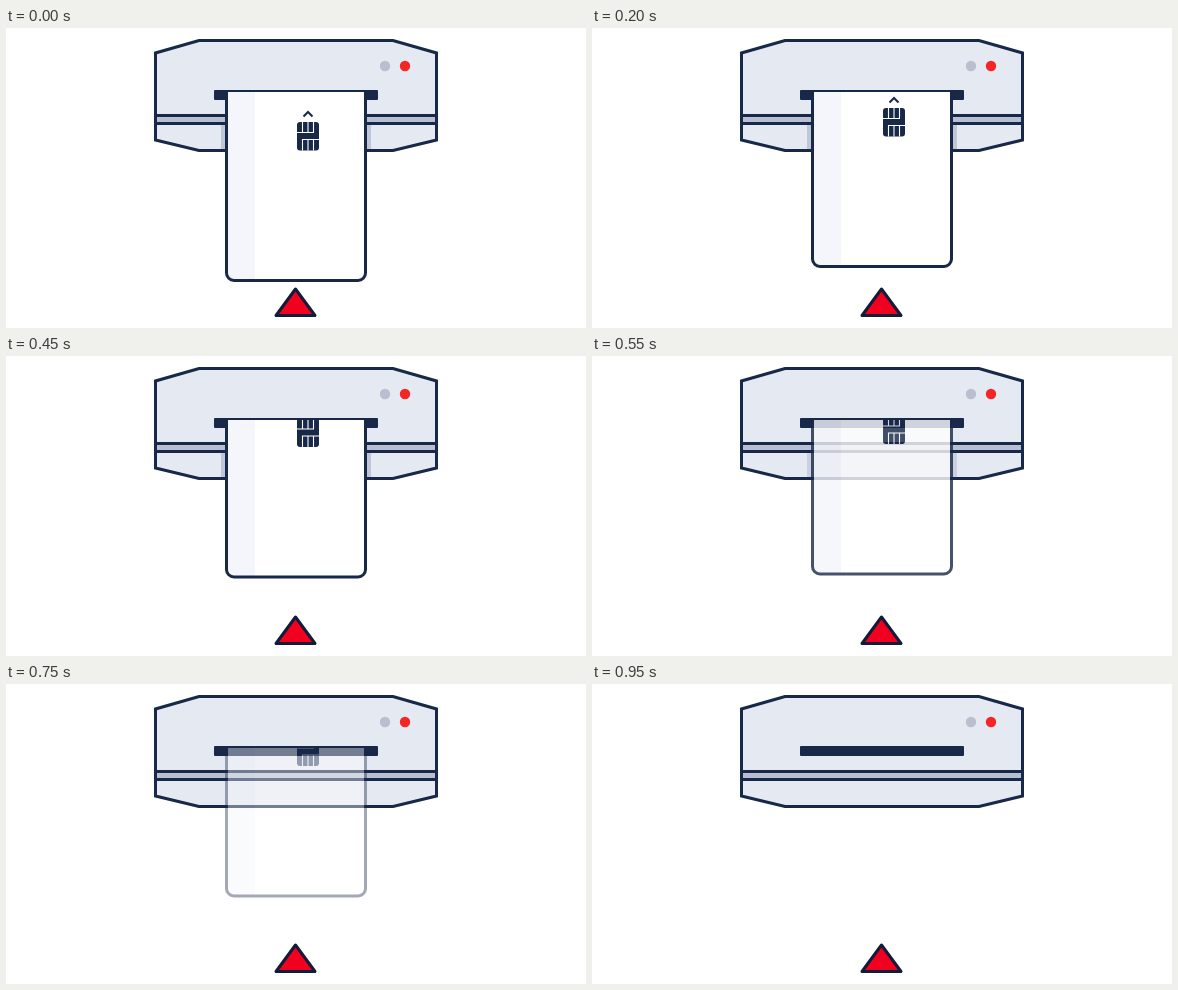
Write an HTML page that moves like this. It is 580 px wide and 300 px high and loops after 1 s.

```html
<!DOCTYPE html>
<html lang="en">
<head>
<meta charset="utf-8">
<title>Card reader</title>
<style>
  html, body { margin: 0; width: 100%; height: 100%; overflow: hidden; background: #fff; }
  svg { display: block; width: 580px; height: 300px; }
</style>
</head>
<body>
<svg viewBox="0 0 580 300">
  <defs>
    <clipPath id="below"><rect x="200" y="64" width="180" height="236"/></clipPath>
  </defs>

  <g stroke="#182848" stroke-width="3">
    <path fill="#e5e9f2" d="M193 12.5H387L430.5 25V112L387 122.5H193L149.5 112V25Z"/>
    <path fill="#b8bfd2" d="M149.5 87.5H430.5V95.5H149.5Z"/>
  </g>
  <circle cx="379" cy="38" r="5.2" fill="#b9bed0"/>
  <circle cx="399" cy="38" r="5.2" fill="#f32626"/>
  <rect x="208" y="62" width="164" height="10" rx="1" fill="#182848"/>
  <rect id="shadow" x="215" y="97" width="150" height="24" fill="#bfc6d8"/>

  <g id="fade" clip-path="url(#below)">
    <g id="card">
      <rect x="220.5" y="40" width="139" height="212.5" rx="7.5" fill="#fff"/>
      <path d="M220.5 40H249V252.5H228Q220.5 252.5 220.5 245Z" fill="#f5f6fb"/>
      <rect x="220.5" y="40" width="139" height="212.5" rx="7.5" fill="none" stroke="#182848" stroke-width="3"/>
      <path d="M297.5 88.5L302 84L306.5 88.5" fill="none" stroke="#182848" stroke-width="2"/>
      <rect x="291" y="94" width="22" height="28.5" rx="3" fill="#182848"/>
      <path d="M296.5 94V104.5M302 94V104.5M307.5 94V104.5M291 104.5H308M296 111.5H313M296.5 111V122.5M302 111V122.5M307.5 111V122.5"
            fill="none" stroke="#fff" stroke-width="1.1"/>
    </g>
  </g>

  <path d="M289.5 261L309 287.5H270Z" fill="#f2001f" stroke="#111d38" stroke-width="3" stroke-linejoin="round"/>
</svg>
<script>
  const LOOP = 1000, STEP = 50, TURN = 450, END = 950;
  const [card, fade, shadow] = ["card", "fade", "shadow"].map(id => document.getElementById(id));

  // Fast feed up to TURN, then a slower feed while fading out.
  function draw(now) {
    const t = Math.floor((now % LOOP) / STEP) * STEP;
    const late = Math.max(0, t - TURN);
    const rise = Math.min(t, TURN) * 0.07 + late * 0.03;
    card.setAttribute("transform", `translate(0 ${-rise})`);
    fade.setAttribute("opacity", Math.max(0, 1 - late / (END - TURN)));
    shadow.setAttribute("opacity", Math.max(0, 1 - late / 300));
  }

  let start;
  function tick(now) {
    start ??= now;
    draw(now - start);
    requestAnimationFrame(tick);
  }
  draw(0);
  requestAnimationFrame(tick);
</script>
</body>
</html>
```
